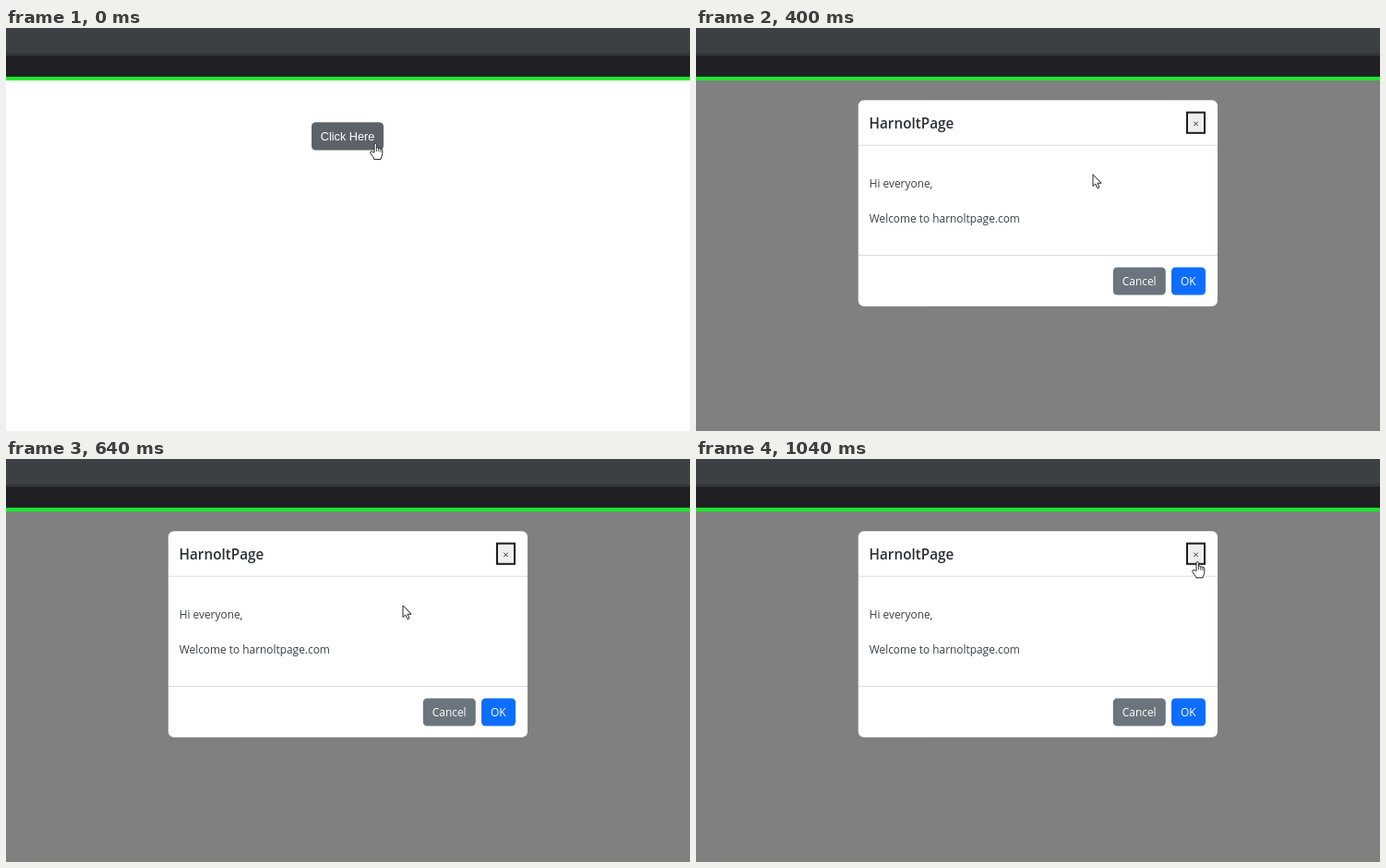
These frames come from a looping animation (741x437 px, 1200 ms). An HTML page:

```html
<!DOCTYPE html>
<html lang="en">
<head>
<meta charset="utf-8">
<title>Modal dialog</title>
<style>
  html, body { margin: 0; width: 100%; height: 100%; overflow: hidden; background: #fff; }
  svg { display: block; width: 741px; height: 437px; }
  text { font: 11.9px "Open Sans", "Noto Sans", sans-serif; fill: #3b4045; }
  .title { font-size: 15.3px; font-weight: 600; fill: #2b3035; }
  .trigger { font: 12.7px "Liberation Sans", Arial, sans-serif; }
  .light { fill: #fff; }
  .mid { text-anchor: middle; }
  .rule { stroke: #d9dcdf; }
  .cursor { fill: #fff; stroke: #222; stroke-linejoin: round; stroke-linecap: round; }
</style>
</head>
<body>
<svg viewBox="0 0 741 437">
  <rect width="741" height="437" fill="#fff"/>

  <g id="page">
    <rect x="331" y="102.3" width="78" height="30.3" rx="4.5" fill="#5c6268"/>
    <text class="trigger light mid" x="370" y="122">Click Here</text>
  </g>

  <g id="modal">
    <rect y="56" width="741" height="381" fill="#808080"/>
    <rect x="175.8" y="78.2" width="389.2" height="223.6" rx="6" fill="#fff"/>
    <path class="rule" d="M176 127.2H565M176 246.5H565"/>
    <text class="title" x="187.5" y="108.6">HarnoltPage</text>
    <rect x="532" y="91.6" width="19" height="22.2" fill="#efefef" stroke="#1c1c1c" stroke-width="2"/>
    <path d="M539.3 101.6l4.4 4.4m0-4.4l-4.4 4.4" stroke="#333"/>
    <text x="187.7" y="173.2">Hi everyone,</text>
    <text x="187.7" y="210.7">Welcome to harnoltpage.com</text>
    <rect x="451.8" y="259.4" width="57" height="30.2" rx="4.5" fill="#6c757d"/>
    <text class="light mid" x="480.2" y="279.3">Cancel</text>
    <rect x="515" y="259.4" width="37" height="30.2" rx="4.5" fill="#0d6efd"/>
    <text class="light mid" x="533.4" y="279.3">OK</text>
  </g>

  <rect width="741" height="27" fill="#3c4043"/>
  <rect y="27" width="741" height="3" fill="#35363a"/>
  <rect y="30" width="741" height="23" fill="#202024"/>
  <rect y="52.8" width="741" height="4" fill="#1bea2c"/>

  <g id="hand" class="cursor">
    <path d="M-1.4 9.6V1.2Q-1.4 0 -.2 0T1 1.2V5.4Q1.2 4.6 2.2 4.7T3.3 5.8Q3.6 5 4.5 5.2T5.5 6.3Q5.9 5.7 6.7 6T7.4 7.3V11.3Q7.4 13 6.5 14.6Q5.8 16 5.6 17.4H-1.6Q-1.8 15.8 -3.2 14.2L-5.5 11Q-6.2 9.8 -5.3 9.1T-3.3 9.2Z"/>
    <path d="M1 5.4V8.6M3.3 5.8V8.8M5.5 6.3V9" stroke-width=".8"/>
  </g>
  <path id="arrow" class="cursor" d="M0 0V12.4L2.8 9.8L4.9 14.5L7 13.6L4.9 9H8.7Z"/>
</svg>
<script>
  const LOOP = 1200;
  const states = [
    { open: false, cursor: "hand", x: 400.4, y: 125 },
    { open: true, cursor: "arrow", x: 430, y: 159.2 },
    { open: true, cursor: "hand", x: 543.4, y: 111.4 }
  ];
  const el = id => document.getElementById(id);
  const show = (id, on) => el(id).setAttribute("display", on ? "inline" : "none");

  function draw(ms) {
    const s = states[Math.floor((ms % LOOP) / (LOOP / states.length))];
    show("page", !s.open);
    show("modal", s.open);
    for (const id of ["hand", "arrow"]) show(id, id === s.cursor);
    el(s.cursor).setAttribute("transform", `translate(${s.x} ${s.y})`);
  }

  const start = performance.now();
  function tick() {
    draw(performance.now() - start);
    requestAnimationFrame(tick);
  }
  tick();
</script>
</body>
</html>
```
